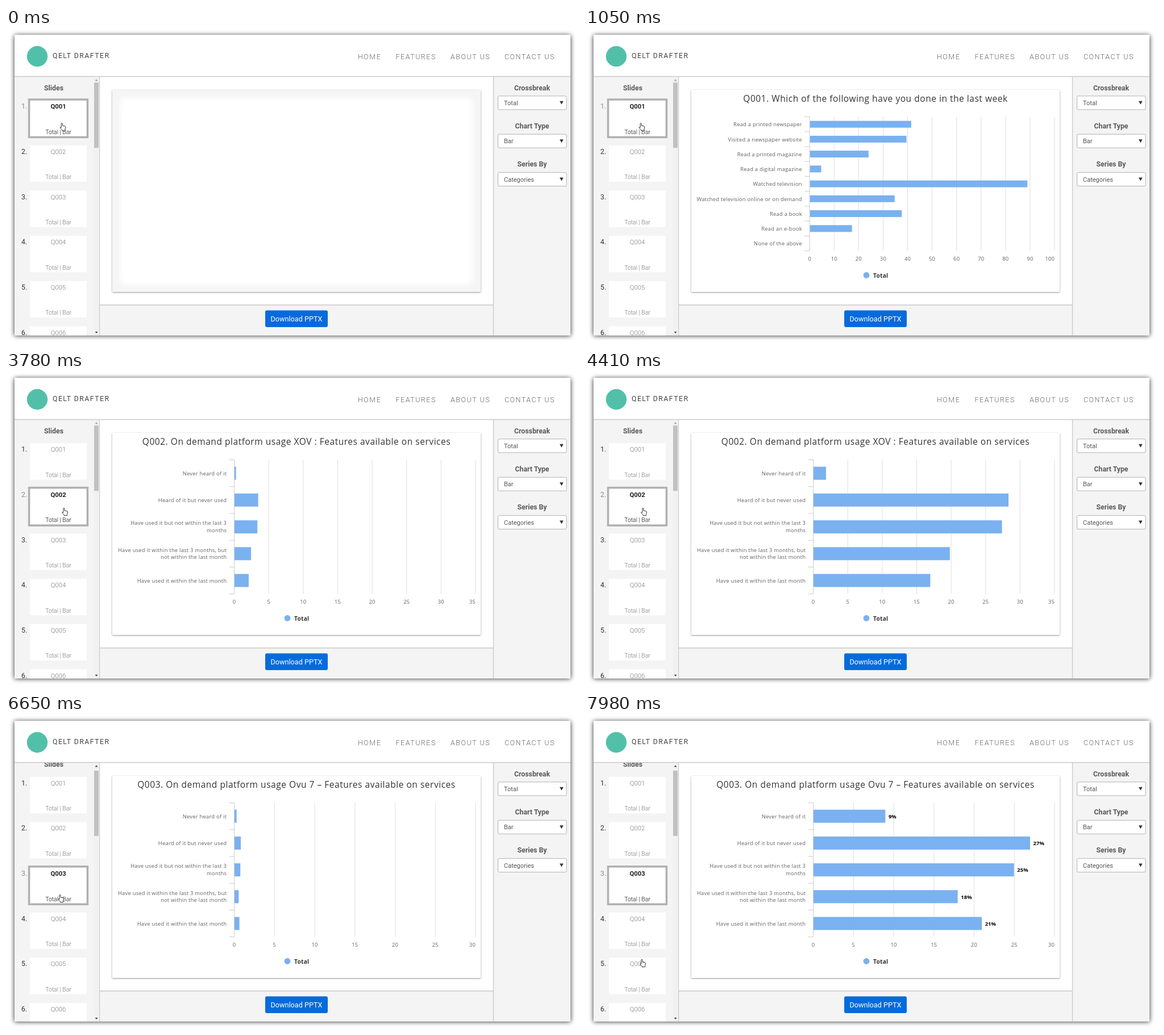
These frames come from a looping animation (1008x555 px, 8 s). An HTML page:

```html
<!DOCTYPE html>
<html lang="en">
<head>
<meta charset="utf-8">
<title>Slide builder</title>
<style>
  html, body { margin: 0; width: 100%; height: 100%; overflow: hidden; background: #fff; }
  svg { display: block; width: 100%; height: 100%; font-family: Roboto, sans-serif; }
  .chart { font-family: "Open Sans", sans-serif; font-size: 9.4px; letter-spacing: .24px; fill: #606060; }
  .title { font-size: 15.5px; letter-spacing: .53px; fill: #333; }
  .value { font-weight: 700; fill: #000; letter-spacing: .1px; }
  .legend { font-size: 10.2px; font-weight: 700; fill: #333; }
  .brand { font-size: 12.3px; letter-spacing: 1.45px; fill: #444; }
  .nav { font-size: 12.5px; letter-spacing: 1.5px; font-weight: 300; fill: #666; }
  .head { font-size: 12.3px; font-weight: 700; fill: #5a5a5a; }
  .option { font-size: 11px; fill: #555; }
  .num { font-size: 12.3px; fill: #333; }
  .name { font-size: 11.3px; font-weight: 300; fill: #777; }
  .kind { font-size: 10.4px; font-weight: 300; fill: #777; }
  .on .num { fill: #8a8a8a; }
  .on .name { font-weight: 700; fill: #222; }
  .on .kind { fill: #111; }
  .frame { display: none; }
  .on .frame { display: inline; }
</style>
</head>
<body>
<svg id="stage" viewBox="0 0 1008 555"></svg>
<script>
const LOOP = 8000, ROW = 79.65, BLUE = '#7ab1f0';

const usage = [
  ['Never heard of it'],
  ['Heard of it but never used'],
  ['Have used it but not within the last 3', 'months'],
  ['Have used it within the last 3 months, but', 'not within the last month'],
  ['Have used it within the last month']
];
const media = ['Read a printed newspaper', 'Visited a newspaper website', 'Read a printed magazine',
  'Read a digital magazine', 'Watched television', 'Watched television online or on demand',
  'Read a book', 'Read an e-book', 'None of the above'].map(s => [s]);

// pick: card selected and panel cleared, show: axes drawn, grow: bars start
const charts = [
  { title: 'Q001. Which of the following have you done in the last week', rows: media,
    values: [43, 41, 25, 5, 92, 36, 39, 18, 0], max: 100, step: 10, x0: 395.2, barH: 12,
    pick: -100, show: 70, grow: 166 },
  { title: 'Q002. On demand platform usage XOV : Features available on services', rows: usage,
    values: [2, 30, 29, 21, 18], max: 35, step: 5, x0: 401.6, barH: 23,
    pick: 3290, show: 3430, grow: 3561 },
  { title: 'Q003. On demand platform usage Ovu 7 – Features available on services', rows: usage,
    values: [9, 27, 25, 18, 21], max: 30, step: 5, x0: 401.6, barH: 23,
    pick: 6300, show: 6410, grow: 6542 }
];

// pointer keys: time, x, y
const pointer = [
  [0, 98.3, 167], [1750, 98.3, 167], [2030, 98.7, 241], [3290, 98.7, 241], [3570, 102, 241],
  [4760, 102, 241], [5180, 95, 337], [5250, 95, 337], [5670, 95, 318], [7420, 95, 318], [7980, 100, 432]
];

const clamp = v => Math.max(0, Math.min(1, v));
const sine = v => (1 - Math.cos(Math.PI * clamp(v))) / 2;
const rect = (x, y, w, h, fill, more = '') =>
  `<rect x="${x}" y="${y}" width="${w}" height="${h}" fill="${fill}" ${more}/>`;
const text = (x, y, s, cls = '', anchor = 'start') =>
  `<text x="${x}" y="${y}" class="${cls}" text-anchor="${anchor}">${s}</text>`;
const path = (d, fill, more = '') => `<path d="${d}" fill="${fill}" ${more}/>`;

function drawChart(c) {
  const right = 826, top = 156.5, bottom = 392.7;
  const unit = (right - c.x0) / c.max, pitch = (bottom - top) / c.rows.length;
  let lines = '', ticks = '', labels = '', bars = '', values = '';
  for (let v = 0; v <= c.max; v += c.step) {
    const x = c.x0 + v * unit;
    if (v) lines += `M${x} ${top}V${bottom}`;
    labels += v < c.max ? text(x, 410, v, '', 'middle') : text(right, 410, v, '', 'end');
  }
  c.rows.forEach((row, i) => {
    const y = top + pitch * (i + .5), v = c.values[i], shift = row.length > 1 ? -7 : 0;
    ticks += `M${c.x0 - 9} ${y - pitch / 2}h9`;
    row.forEach((s, k) => labels += text(c.x0 - 13.4, y + 3.8 + shift + k * 12.6, s, '', 'end'));
    if (!v) return;
    bars += rect(c.x0 + .4, y - c.barH / 2, 0, c.barH, BLUE, `data-w="${v * unit - 1}"`);
    values += text(c.x0 + v * unit + 5, y + 3.8, v + '%', 'value');
  });
  ticks += `M${c.x0 - 9} ${bottom}h9M${c.x0} ${top}V${bottom}`;
  return `<g class="chart">${text(511, 130, c.title, 'title', 'middle')}
    ${path(lines, 'none', 'stroke="#dedede"')}
    <g class="bars">${bars}</g>
    ${path(ticks, 'none', 'stroke="#c8ccd0"')}${labels}
    <g class="values">${values}</g>
    <circle cx="495" cy="435.5" r="5.4" fill="${BLUE}"/>${text(507, 439.6, 'Total', 'legend')}</g>`;
}

function drawCard(i) {
  const y = i * ROW;
  return `<g class="card">${text(27, 142.3 + y, i + 1 + '.', 'num')}
    ${rect(42, 127.3 + y, 100, 64, '#fff')}
    ${rect(40.6, 126 + y, 102.8, 66.4, '#fff', 'class="frame" stroke="#b0b0b0" stroke-width="3.5"')}
    ${text(92, 142.3 + y, 'Q00' + (i + 1), 'name', 'middle')}
    ${text(92, 186.8 + y, 'Total | Bar', 'kind', 'middle')}</g>`;
}

function drawSelect([head, option], i) {
  const y = i * 67.4;
  return text(925.5, 109.5 + y, head, 'head', 'middle') +
    rect(865.5, 119.8 + y, 120.5, 24, '#fff', 'rx="2" stroke="#b2b2b2"') +
    text(876, 136 + y, option, 'option') + path(`M974 ${128.8 + y}h6.6l-3.3 6z`, '#333');
}

const stage = document.getElementById('stage');
stage.innerHTML = `
  <defs>
    <filter id="glow" x="-10%" y="-10%" width="120%" height="120%"><feGaussianBlur stdDeviation="4.5"/></filter>
    <filter id="soft" x="-5%" y="-5%" width="110%" height="110%"><feGaussianBlur stdDeviation="1.6"/></filter>
    <filter id="haze" x="-5%" y="-5%" width="110%" height="110%"><feGaussianBlur stdDeviation="4"/></filter>
    <clipPath id="side">${rect(15, 86, 149, 455.5, '#000')}</clipPath>
  </defs>
  ${rect(0, 0, 1008, 555, '#fff')}
  ${rect(15, 13, 978, 529, '#000', 'opacity=".85" filter="url(#glow)"')}
  ${rect(15, 12, 978, 529.5, '#fff')}
  <circle cx="55" cy="50" r="18.2" fill="#52c0a9"/>
  ${text(82, 53.2, 'QELT DRAFTER', 'brand')}
  ${[[619, 'HOME'], [685.5, 'FEATURES'], [782, 'ABOUT US'], [877, 'CONTACT US']]
    .map(([x, s]) => text(x, 54.5, s, 'nav')).join('')}
  ${rect(15, 86, 149, 455.5, '#f4f4f4')}
  ${rect(858, 86, 135, 455.5, '#f4f4f4')}
  ${rect(165, 488, 692, 53.5, '#f4f4f4')}
  ${path('M15 85.5H993M164.5 86V541.5M857.5 86V541.5M165 488H857', 'none', 'stroke="#c9c9c9" stroke-width="1.3"')}
  <g clip-path="url(#side)">
    <g id="list">${text(84, 109.5, 'Slides', 'head', 'middle')}${[0, 1, 2, 3, 4, 5].map(drawCard).join('')}</g>
    ${rect(154.5, 86, 9.5, 455.5, '#f1f1f1')}
    ${rect(155, 96.2, 8, 115, '#c1c1c1', 'id="thumb"')}
    ${path('M156.6 93.2h5l-2.5-3z', '#a0a0a0', 'id="up"')}
    ${path('M156.6 535h5l-2.5 3z', '#444')}
  </g>
  ${rect(187, 110, 648, 356, '#000', 'opacity=".42" filter="url(#soft)"')}
  ${rect(187, 109, 648, 356, '#fff')}
  <g id="blank">${rect(187, 109, 648, 356, '#f5f5f5')}
    ${rect(201, 123, 620, 329, '#fff', 'rx="8" filter="url(#haze)"')}</g>
  ${charts.map(drawChart).join('')}
  ${[['Crossbreak', 'Total'], ['Chart Type', 'Bar'], ['Series By', 'Categories']].map(drawSelect).join('')}
  ${rect(456, 497.5, 110, 29.5, '#056bdc', 'rx="3"')}
  <text x="511" y="517" text-anchor="middle" font-size="12.7" fill="#fff">Download PPTX</text>
  <g id="status">
    ${path('M15 528.8H338q2 0 2 2V541.5H15z', '#f2f2f2', 'stroke="#cfcfcf" stroke-width=".8"')}
    <text x="17" y="538" font-size="8" fill="#555">www.qeltdrafter.test..</text>
  </g>
  <g id="cursor" stroke="#222" stroke-width=".9" stroke-linejoin="round">
    ${path('M-1.1 1.2Q0 -.6 1.1 1.2V5.1L4.8 5.7Q6.7 6 6.5 8L5.6 11.5V13.7H.2V12.4L-3.4 8.6Q-3.6 6.9 -1.1 8.4Z', '#fff', 'id="hand"')}
    ${path('M0 0V10L2.3 8L4 11.6L5.5 11L4 7.5H7Z', '#fff', 'id="arrow"')}
  </g>`;

const $ = id => document.getElementById(id);
const show = (el, on) => el.style.display = on ? 'inline' : 'none';
const cards = [...stage.querySelectorAll('.card')];
const views = [...stage.querySelectorAll('.chart')].map(el => ({
  el, bars: [...el.querySelectorAll('.bars rect')], values: el.querySelector('.values')
}));

function pointerAt(t) {
  let i = 0;
  while (i < pointer.length - 2 && t >= pointer[i + 1][0]) i++;
  const [t0, x0, y0] = pointer[i], [t1, x1, y1] = pointer[i + 1];
  const k = sine((t - t0) / (t1 - t0));
  return [x0 + (x1 - x0) * k, y0 + (y1 - y0) * k];
}

function render(t) {
  const now = charts.filter(c => t >= c.pick).length - 1, c = charts[now], view = views[now];
  const drawn = t >= c.show;
  cards.forEach((card, i) => card.classList.toggle('on', i === now));
  views.forEach((v, i) => show(v.el, i === now && drawn));
  show($('blank'), !drawn);

  const k = sine((t - c.grow) / 1000);
  view.bars.forEach(b => b.setAttribute('width', b.dataset.w * k));
  view.values.setAttribute('opacity', clamp((t - c.grow - 1000) / 200));

  const scrolled = now === 2;
  $('list').setAttribute('transform', `translate(0 ${scrolled ? -16.5 : 0})`);
  $('thumb').setAttribute('y', scrolled ? 99.8 : 96.2);
  $('up').setAttribute('fill', scrolled ? '#444' : '#a0a0a0');
  $('status').setAttribute('opacity', clamp((t - 2730) / 140) * clamp((3710 - t) / 140));

  const arrow = t >= 6020 && t < 6300;
  show($('arrow'), arrow);
  show($('hand'), !arrow);
  $('cursor').setAttribute('transform', `translate(${pointerAt(t)})`);
}

const start = performance.now();
function tick() {
  render((performance.now() - start) % LOOP);
  requestAnimationFrame(tick);
}
tick();
</script>
</body>
</html>
```
